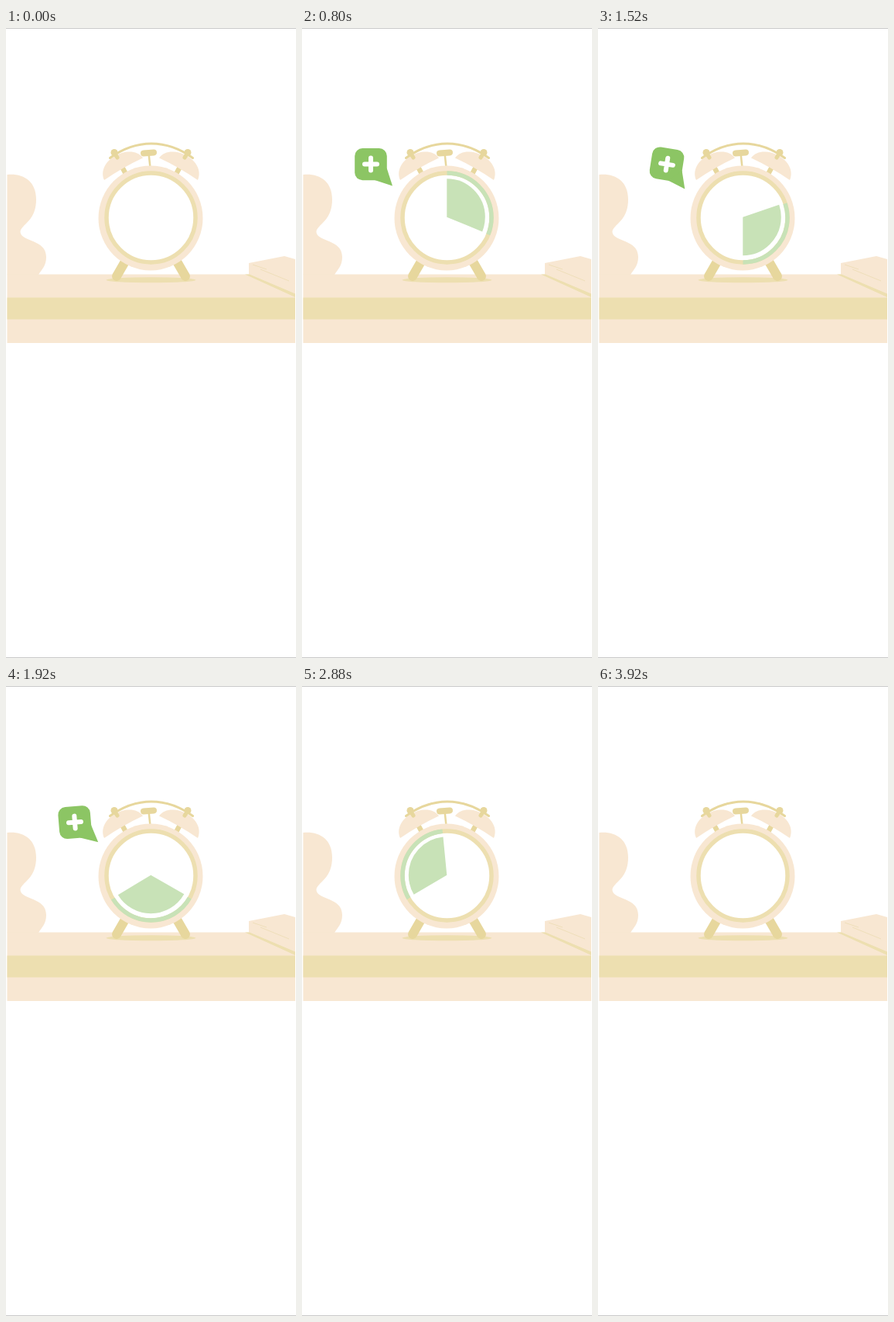
An HTML page for the animation above (4 s loop, 375 by 812 pixels).

```html
<!DOCTYPE html>
<html lang="en">
<head>
<meta charset="utf-8">
<title>Alarm clock</title>
<style>
  html, body { margin: 0; width: 100%; height: 100%; overflow: hidden; background: #fff; }
  svg { display: block; }
  .peach { fill: #f8e7d2; }
  .sand { fill: #eddfb0; }
  .line { fill: none; stroke: #e7d79d; stroke-linecap: round; }
  .sweep { fill: none; stroke: #c8e2b7; }
</style>
</head>
<body>
<svg width="375" height="812" viewBox="0 0 375 812">
  <path d="M0 .5H375M0 811.5H375" stroke="#c9c9c9"/>

  <!-- plant, shelf and book -->
  <g class="peach">
    <path d="M1.5 189C22 187 39 197 39 221C39 250 18 254 18.5 263C20 276 52 272 52 295C52 307 46 311 42 318H1.5Z"/>
    <path d="M1.5 317.5H374V406H1.5Z"/>
    <path d="M314 303L360 294L374 298V330L314 318Z"/>
  </g>
  <path class="sand" d="M1.5 347.5H374V375.5H1.5Z"/>
  <path class="sand" d="M309 317.5H315L374 342.5V347Z"/>
  <path d="M319 305L337 311M329 311L366 326" fill="none" stroke="#efdfba"/>

  <!-- clock -->
  <ellipse class="sand" cx="187.5" cy="324.8" rx="58" ry="3.5"/>
  <defs>
    <g id="side">
      <path class="line" stroke-width="12" d="M154 301L143 320"/>
      <path class="line" stroke-width="6.5" stroke-linecap="butt" d="M150 179L156 190"/>
      <path class="peach" d="M127 196C122 185 128 172 141 165C155 157 170 158 177 167.5Q152 179 127 196Z"/>
      <circle cx="140" cy="160.5" r="4.5" fill="#e7d79d"/>
      <path class="line" stroke-width="5" stroke-linecap="butt" d="M140 161L144 167"/>
    </g>
  </defs>
  <use href="#side"/>
  <use href="#side" transform="matrix(-1 0 0 1 375 0)"/>
  <path class="line" stroke-width="3" d="M134.5 167.5Q160 149 188 149T241.5 167.5"/>
  <path class="line" stroke-width="2.5" d="M184.8 164L186.5 180"/>
  <path class="line" stroke-width="8" d="M178 161.4L191 160.4"/>
  <circle class="peach" cx="187" cy="245" r="67.5"/>
  <circle cx="187.5" cy="244.5" r="57.5" fill="#fff" stroke="#eddfb0" stroke-width="5.5"/>

  <circle class="sweep" cx="187.5" cy="244.5" r="57.5" stroke-width="5.5" pathLength="360" transform="rotate(-90 187.5 244.5)"/>
  <circle class="sweep" cx="187.3" cy="243.7" r="24.75" stroke-width="49.5" pathLength="360" transform="rotate(-90 187.3 243.7)"/>

  <!-- speech bubble, drawn around its own centre -->
  <g id="bubble">
    <rect x="-20.8" y="-20.6" width="41.6" height="41.2" rx="10" fill="#8cc564"/>
    <path d="M5 20.4L28 28L20.6 5Z" fill="#8cc564"/>
    <path d="M-8 0H8M0 -8V8" stroke="#fff" stroke-width="6" stroke-linecap="round"/>
  </g>
</svg>
<script>
const LOOP = 4000, STEP = 80;
const bubble = document.getElementById("bubble");
const sweeps = document.querySelectorAll(".sweep");

// Eased progress from 0 to 1 between two times
const ease = (t, from, to) => {
  const p = Math.min(1, Math.max(0, (t - from) / (to - from)));
  return p * p * (3 - 2 * p);
};

// Three eased thirds of a turn, in degrees
const thirds = (t, begin, gap, length) => [0, 1, 2].reduce(
  (sum, i) => sum + 120 * ease(t, begin + i * gap, begin + i * gap + length), 0);

function draw(t) {
  const tail = thirds(t, 980, 980, 960);
  const head = thirds(t, 40, 1030, 900);
  for (const sweep of sweeps) {
    sweep.style.display = head - tail > 0.1 ? "" : "none";
    sweep.setAttribute("stroke-dasharray", `${head - tail} 360`);
    sweep.setAttribute("stroke-dashoffset", -tail);
  }

  const scale = ease(t, 400, 640) - ease(t, 2580, 2840);
  const spin = 180 * (1 - ease(t, 520, 800));
  const wiggle = 10 * ease(t, 1200, 1600) - 22 * ease(t, 1600, 2120) + 12 * ease(t, 2120, 2360);
  bubble.setAttribute("transform", `translate(89 175.6) rotate(${spin + wiggle}) scale(${scale})`);
}

const begin = performance.now();
function tick() {
  const t = (performance.now() - begin) % LOOP;
  draw(Math.floor(t / STEP) * STEP);
  requestAnimationFrame(tick);
}
tick();
</script>
</body>
</html>
```
